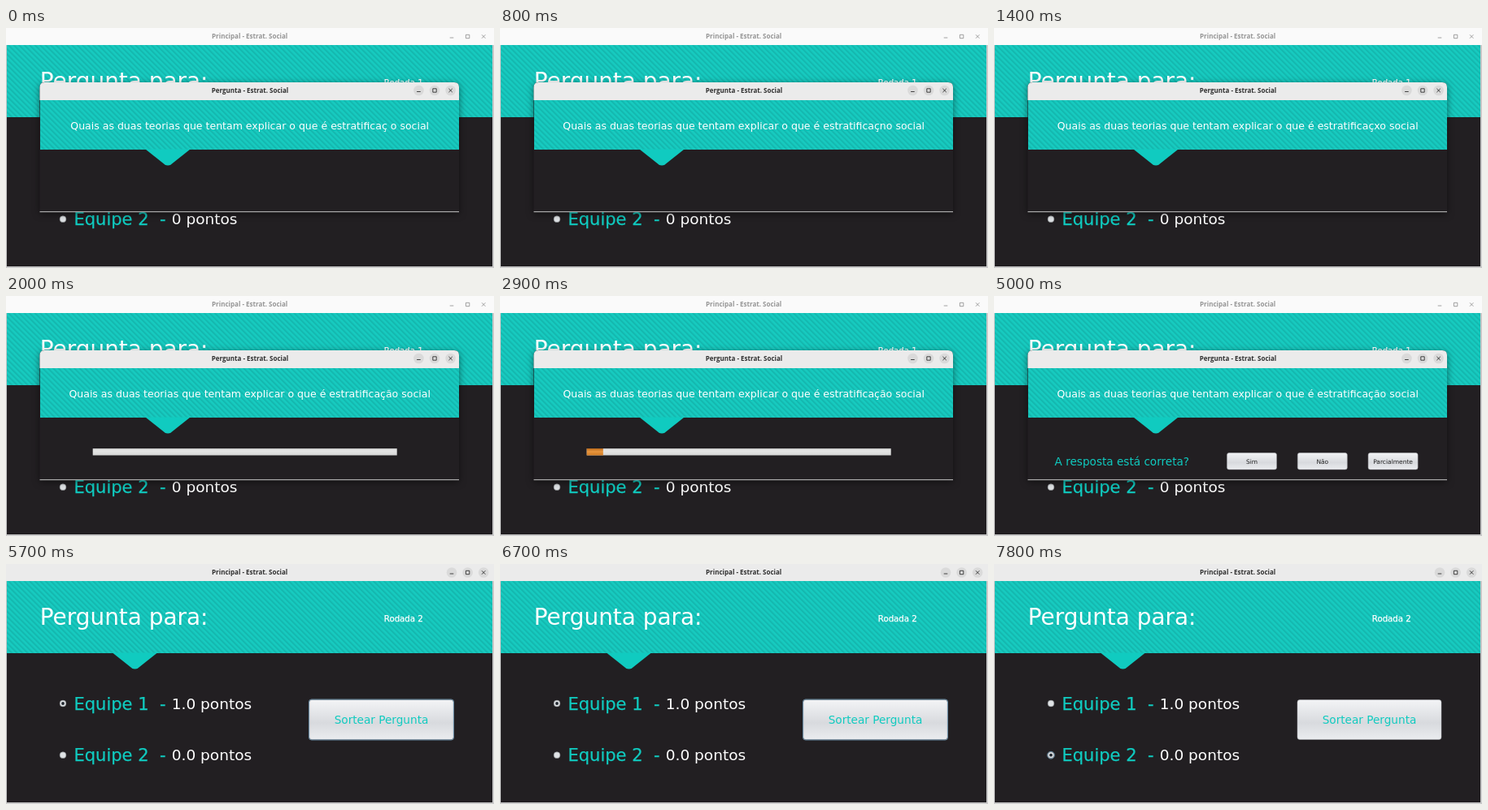
Recreate the animation shown at these times as an HTML page. Size 600 px wide and 296 px high, loop 8 s.

```html
<!DOCTYPE html>
<html lang="pt">
<head>
<meta charset="utf-8">
<title>Quiz</title>
<style>
html, body { margin: 0; width: 100%; height: 100%; overflow: hidden; background: #c8c8c8; }
svg { display: block; width: 600px; height: 296px; font-family: "DejaVu Sans", sans-serif; }
.title { font: bold 8px "Open Sans", sans-serif; text-anchor: middle; fill: var(--ink); }
.bar { fill: var(--bar); }
.disc { fill: var(--disc); }
.icon { fill: none; stroke: var(--ink); stroke-width: .9; }
svg { --ink: #303030; --bar: #ebebeb; --disc: #dadada; }
.idle { --ink: #969696; --bar: #fafafa; --disc: none; }
.teal { fill: #10cbc0; }
.team { font-size: 21px; stroke: #10cbc0; stroke-width: .25; }
.score { font-size: 18.5px; fill: #fff; }
.btn { fill: url(#metal); stroke: #a4a7ac; stroke-width: .5; }
.small { font-size: 7.5px; text-anchor: middle; fill: #222; }
.mid { text-anchor: middle; }
.focus { fill: none; stroke: #6b8ea6; stroke-width: 1; }
</style>
</head>
<body>
<svg viewBox="0 0 600 296">
  <defs>
    <pattern id="stripes" width="4.6" height="4.6" patternUnits="userSpaceOnUse" patternTransform="rotate(-45)">
      <rect width="4.6" height="4.6" fill="#17cbc0"/>
      <rect width="2.1" height="4.6" fill="#14b8af"/>
    </pattern>
    <linearGradient id="metal" x2="0" y2="1">
      <stop stop-color="#f3f4f6"/><stop offset=".58" stop-color="#d8dade"/><stop offset="1" stop-color="#eaecef"/>
    </linearGradient>
    <linearGradient id="track" x2="0" y2="1">
      <stop stop-color="#c4c4c4"/><stop offset=".3" stop-color="#e6e6e6"/><stop offset="1" stop-color="#d6d6d6"/>
    </linearGradient>
    <linearGradient id="orange" x2="0" y2="1">
      <stop stop-color="#b9681a"/><stop offset=".45" stop-color="#e8963f"/><stop offset="1" stop-color="#cf7a22"/>
    </linearGradient>
    <filter id="shadow" x="-10%" y="-20%" width="120%" height="150%" color-interpolation-filters="sRGB">
      <feDropShadow dx="0" dy="2" stdDeviation="4" flood-opacity=".5"/>
    </filter>
    <path id="notch" class="teal" d="M-27.5 -.5H27.5L4 18.2Q0 20.6 -4 18.2Z"/>
    <g id="controls">
      <g class="disc">
        <circle r="6.3"/><circle cx="19.6" r="6.3"/><circle cx="39.2" r="6.3"/>
      </g>
      <path class="icon" d="M-2.3 1.5H2.3M17.4 -2.2h4.4v4.4h-4.4zM37 -2.2l4.4 4.4m0 -4.4l-4.4 4.4"/>
    </g>
  </defs>

  <g id="main">
    <rect class="bar" width="600" height="21"/>
    <text class="title" x="299.7" y="13.3">Principal - Estrat. Social</text>
    <use href="#controls" x="548" y="10.5"/>
    <rect x="1" y="21" width="597" height="273" fill="#221f22"/>
    <rect x="1" y="21" width="597" height="89" fill="url(#stripes)"/>
    <use href="#notch" x="158.5" y="110"/>
    <text x="41.8" y="75" font-size="27.9" fill="#fff">Pergunta para:</text>
    <text id="round" x="464.8" y="71.2" font-size="10.2" fill="#fff" stroke="#fff" stroke-width=".25"></text>
    <g id="teams"></g>
    <rect class="btn" x="373" y="167.5" width="177" height="49" rx="3"/>
    <rect id="btnFocus" class="focus" x="372.5" y="167" width="178" height="50" rx="3"/>
    <text class="teal mid" x="461.5" y="197.3" font-size="13.64">Sortear Pergunta</text>
  </g>

  <g id="dialog">
    <path d="M41.5 227V73q0 -6 6 -6H551q6 0 6 6V227Z" fill="#221f22" filter="url(#shadow)"/>
    <path class="bar" d="M41.5 89V73q0 -6 6 -6H551q6 0 6 6V89Z"/>
    <text class="title" x="300" y="80">Pergunta - Estrat. Social</text>
    <use href="#controls" x="507.4" y="77"/>
    <rect x="42" y="89" width="515" height="61" fill="url(#stripes)"/>
    <use href="#notch" x="199" y="150"/>
    <path d="M41.5 226.7H557" stroke="#c8c8c8"/>
    <text id="question" class="mid" x="299.7" y="124.5" font-size="12.52" fill="#fff"></text>
    <g id="timer">
      <rect x="106.7" y="188" width="374" height="8.5" fill="url(#track)"/>
      <rect id="fill" x="106.7" y="188" height="8.5" fill="url(#orange)"/>
    </g>
    <g id="answer">
      <text class="teal" x="74.6" y="209" font-size="13.6">A resposta está correta?</text>
    </g>
  </g>
</svg>
<script>
const LOOP = 8000;
const $ = id => document.getElementById(id);
const show = (id, on) => $(id).setAttribute('visibility', on ? 'visible' : 'hidden');
const setText = (id, s) => { if ($(id).textContent !== s) $(id).textContent = s; };

$('teams').innerHTML = [1, 2].map(n => `<g transform="translate(0 ${(n - 1) * 63.7})">
  <circle cx="70" cy="172" r="3.9" fill="#e0e3e6" stroke="#85888c" stroke-width=".6"/>
  <circle id="dot${n}" cx="70" cy="172" r="1.9" fill="#20262e"/>
  <circle id="ring${n}" class="focus" cx="70" cy="172" r="4.4"/>
  <text class="team teal" x="83.5" y="179.8">Equipe ${n}</text>
  <text class="team teal" x="189" y="179.8">-</text>
  <text id="score${n}" class="score" x="203.8" y="178.6"></text></g>`).join('');

$('answer').innerHTML += ['Sim', 'Não', 'Parcialmente'].map((label, i) => {
  const x = 286.5 + i * 86.8;
  return `<rect class="btn" x="${x}" y="193.5" width="61" height="20.5" rx="2.5"/>
    <text class="small" x="${x + 30.5}" y="206.7">${label}</text>`;
}).join('');

const letters = '\u00a0abcdefghijklmnopqrstuvwxyzàáâã';

function draw(t) {
  const closing = t >= 5550;
  const picked = t < 7800 ? 1 : 2;

  // the last letter is searched through the alphabet
  const letter = letters[Math.min(letters.length - 1, Math.floor(t / 57))];
  setText('question', `Quais as duas teorias que tentam explicar o que é estratificaç${letter}o social`);

  const ticks = Math.max(0, Math.floor((t - 1900) / 250));
  $('fill').setAttribute('width', ticks * 5.03);

  const fade = Math.min(1, Math.max(0, (t - 5550) / 150));
  $('dialog').setAttribute('opacity', 1 - fade);
  $('dialog').setAttribute('display', fade < 1 ? 'inline' : 'none');
  show('timer', t >= 1900 && t < 5000);
  show('answer', t >= 5000);

  $('main').setAttribute('class', closing ? '' : 'idle');
  setText('round', closing ? 'Rodada 2' : 'Rodada 1');
  setText('score1', closing ? '1.0 pontos' : '0 pontos');
  setText('score2', closing ? '0.0 pontos' : '0 pontos');
  show('dot1', picked === 1);
  show('dot2', picked === 2);
  show('ring1', false);
  show('ring2', picked === 2);
  show('btnFocus', picked === 1);
}

const start = performance.now();
function frame() {
  draw((performance.now() - start) % LOOP);
  requestAnimationFrame(frame);
}
frame();
</script>
</body>
</html>
```
